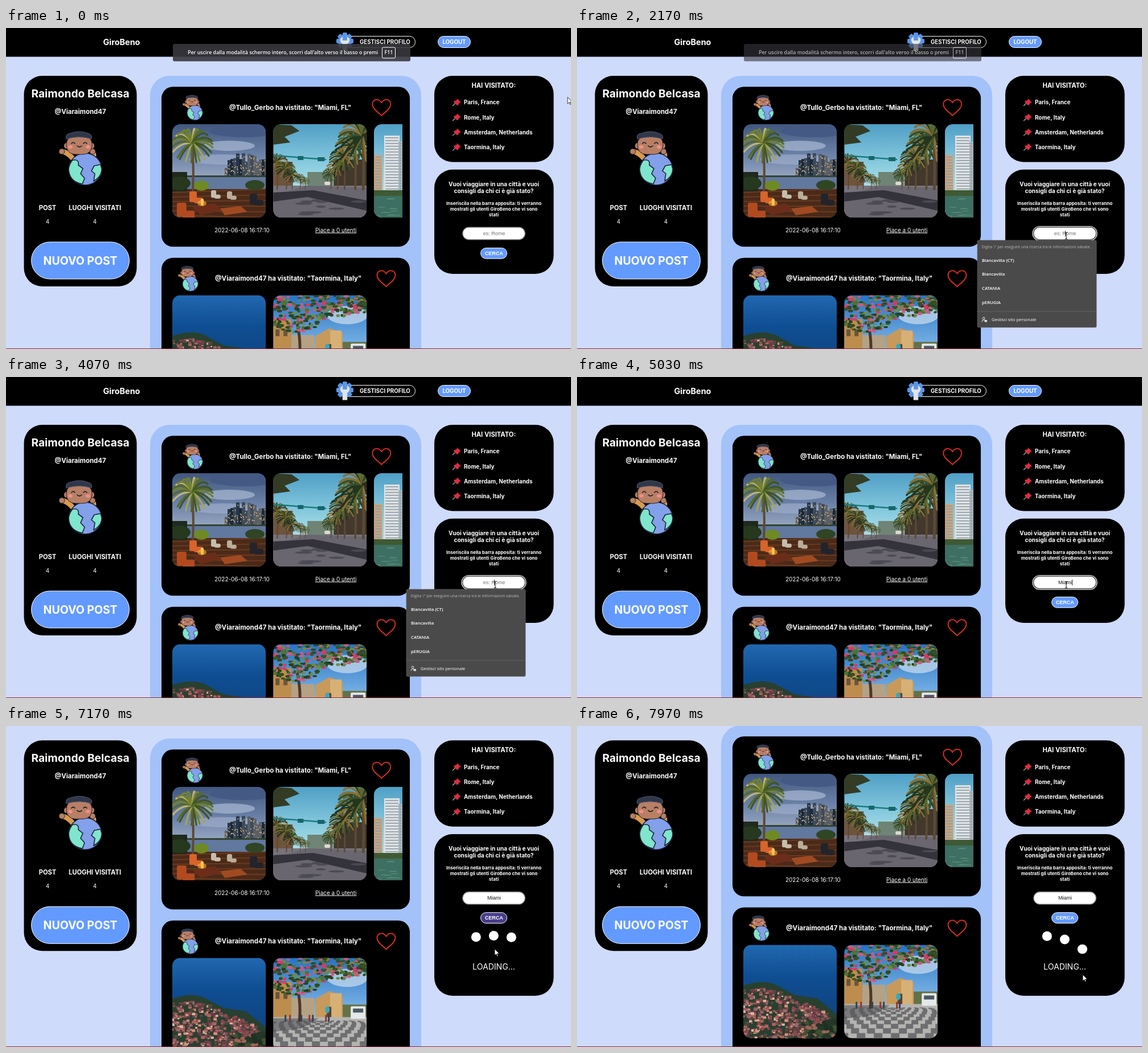
An HTML page for the animation above (8000 ms loop, 992 px wide and 564 px high).

```html
<!DOCTYPE html>
<html lang="it">
<head>
<meta charset="utf-8">
<style>
html, body { margin: 0; width: 100%; height: 100%; overflow: hidden; background: #cfdbfb; }
svg { display: block; }
text { font-family: Inter, sans-serif; font-weight: 700; fill: #fff; white-space: pre; }
.mid { text-anchor: middle; }
.regular { font-weight: 400; }
.ui { font-family: "Open Sans", sans-serif; font-weight: 600; }
.form { font-family: "Liberation Sans", Arial, sans-serif; }
</style>
</head>
<body>
<svg id="stage" width="992" height="564" viewBox="0 0 992 564"></svg>
<script>
const LOOP = 8000, OPEN = 1650, TYPE = 4200, KEY = 175, CLICK = 6545, STICKY = 58.7;
const BLUE = '#639aff', HOVER = '#483d8b';

let seed = 7;
const rnd = (a = 0, b = 1) => {
  seed = (seed * 16807) % 2147483647;
  return a + (b - a) * seed / 2147483647;
};
const pick = list => list[Math.floor(rnd(0, list.length))];
const many = (n, make) => Array.from({ length: n }, (_, i) => make(i)).join('');

const rect = (x, y, w, h, fill, r = 0, extra = '') =>
  `<rect x="${x}" y="${y}" width="${w}" height="${h}" rx="${r}" fill="${fill}" ${extra}/>`;
const oval = (x, y, rx, ry, fill, extra = '') =>
  `<ellipse cx="${x}" cy="${y}" rx="${rx}" ry="${ry}" fill="${fill}" ${extra}/>`;
const path = (d, fill, stroke = 'none', width = 1, extra = '') =>
  `<path d="${d}" fill="${fill}" stroke="${stroke}" stroke-width="${width}" stroke-linecap="round" stroke-linejoin="round" ${extra}/>`;
const text = (x, y, size, words, cls = '', extra = '') =>
  `<text x="${x}" y="${y}" font-size="${size}" class="${cls}" ${extra}>${words}</text>`;
const group = (x, y, body, extra = '', scale = 1) =>
  `<g transform="translate(${x} ${y}) scale(${scale})" ${extra}>${body}</g>`;
const pill = (x, y, w, h, fill, extra = '') => rect(x, y, w, h, fill, h / 2, `stroke="#fff" ${extra}`);
const gradient = (id, ...stops) => `<linearGradient id="${id}" x2="0" y2="1">${stops.map((c, i) =>
  `<stop offset="${i / (stops.length - 1)}" stop-color="${c}"/>`).join('')}</linearGradient>`;

function palm(x, y, r, colors, bottom) {
  const trunk = path(`M${x} ${y}Q${x + 3} ${(y + bottom) / 2} ${x + 1} ${bottom}`, 'none', '#5c4a35', r / 9);
  return trunk + many(24, i => {
    const a = i / 24 * 6.28 + rnd(0, .2), dx = Math.cos(a) * r, dy = Math.sin(a) * r * .8;
    return path(`M${x} ${y}Q${x + dx * .6} ${y + dy * .8 - r * .25} ${x + dx} ${y + dy + r * .15}`,
      'none', pick(colors), r / 11);
  });
}

const chair = (x, y, s, fill) => rect(x, y, 13 * s, 19 * s, fill, 3) + rect(x + 8 * s, y + 11 * s, 16 * s, 10 * s, fill, 3);

function duskTerrace() {
  const city = many(15, i => {
    const x = 92 + i * 5, h = rnd(16, 33) + (i > 2 && i < 12 ? 10 : 0);
    return rect(x, 93 - h, 6, h, pick(['#26364c', '#3c4a5c', '#1c2939', '#5b5f66'])) +
      many(5, () => rect(x + rnd(0, 4), 92 - rnd(2, h - 2), 1.5, 2, '#d9b678'));
  });
  return rect(0, 0, 164, 164, 'url(#dusk)') +
    oval(125, 12, 60, 11, '#445a85') + oval(100, 38, 45, 9, '#a9b9d3', 'opacity=".7"') +
    oval(90, 62, 60, 9, '#a3b3cf', 'opacity=".6"') +
    city + rect(0, 92, 164, 30, '#61789f') + rect(0, 90, 164, 3, '#33422f') + rect(0, 114, 164, 50, '#4a2a19') +
    many(6, i => path(`M0 ${120 + i * 8}L164 ${114 + i * 10}`, 'none', '#6b3a1f', 2)) +
    rect(0, 84, 26, 34, '#1f2a1c') +
    oval(12, 104, 20, 12, '#26381e') + oval(51, 108, 13, 9, '#6e8a22') + oval(145, 107, 17, 9, '#2f4524') +
    palm(35, 33, 36, ['#73812f', '#a8a355', '#3f5526', '#55692c', '#c0b56c'], 116) +
    chair(30, 118, 1, '#d6642c') + chair(8, 138, 1.3, '#b24a20') +
    chair(68, 116, .7, '#c6bdaa') + chair(96, 118, .7, '#b9ae9b') + chair(136, 122, 1, '#22242b') +
    path('M36 146l38 -7 14 12 -38 9z', '#6b2d19') + path('M84 148l36 -4 12 10 -40 6z', '#a04a22') +
    rect(50, 131, 5, 12, '#ffd667', 2) + oval(52, 139, 8, 5, '#ffb23a', 'opacity=".6"');
}

function palmStreet() {
  const greens = ['#23371f', '#38502a', '#5b6730', '#8a6f34', '#2b2c1d'];
  return rect(0, 0, 164, 164, 'url(#noon)') +
    rect(0, 66, 34, 48, '#6f543c') + rect(106, 62, 58, 52, '#43382c') + rect(60, 84, 45, 24, '#6f8474') +
    rect(0, 108, 164, 56, '#77737c') + path('M0 126L60 108 164 112V164H0z', '#69666f') +
    path('M0 120L70 116 164 134V152L60 128 0 136z', '#34333c') +
    many(9, () => oval(rnd(40, 150), rnd(134, 160), rnd(8, 20), 2, '#4c4a54')) +
    many(10, i => palm([6, 22, 32, 46, 55, 100, 112, 124, 143, 157][i], [66, 78, 90, 94, 99, 87, 74, 57, 38, 20][i],
      [20, 17, 13, 10, 9, 14, 18, 25, 34, 42][i], greens, 114)) +
    path('M0 0L32 2 46 12 20 22 30 32 0 36z', '#333b25') +
    path('M0 55L92 62', 'none', '#167d80', 2.5) + rect(43, 56, 10, 7, '#16666a') + rect(78, 58, 12, 7, '#16666a') +
    rect(90, 101, 10, 6, '#ded9d0', 2);
}

function towers() {
  const tower = (x, y, w, h, wall) => rect(x, y, w, h, wall) +
    many(Math.floor(h / 5), i => rect(x + 2, y + 3 + i * 5, w - 4, 1.6, '#8d9aa5'));
  return rect(0, 0, 50, 164, 'url(#noon)') + tower(0, 54, 15, 66, '#c6a582') +
    tower(18, 20, 27, 102, '#dfe3e4') + tower(43, 30, 7, 92, '#a8b4bd') + rect(0, 116, 50, 12, '#3e5a34') +
    rect(0, 126, 50, 38, '#3d6f62') + many(12, () => rect(rnd(0, 40), rnd(130, 162), 12, 1.2, '#5c8b78'));
}

function hillTown() {
  const walls = ['#b0655c', '#d4957f', '#8b4a50', '#dcb8a2', '#603c46', '#98696c', '#3f4a3c'];
  return rect(0, 0, 164, 164, 'url(#sea)') +
    path('M0 72Q30 60 55 69L90 88 130 94 164 122V164H0z', '#27402f') +
    many(480, () => {
      const x = rnd(-3, 150), top = 76 + Math.max(0, x - 50) * .45, y = top + rnd() * (164 - top), s = rnd(3, 7);
      return rect(x, y, s, s * .8, pick(walls)) + rect(x, y - 1, s, 1.4, '#87434a');
    }) + path('M100 164Q125 132 164 128V164z', '#24382a') +
    many(40, () => oval(rnd(105, 164), rnd(136, 164), 4, 3, pick(['#3d5131', '#9c6453', '#1f3023'])));
}

function blossomSquare() {
  const tiles = many(11, r => many(24, c => {
    const y = 110 + r * r * .45, h = 1.4 + r * .9, w = 5 + r;
    return (r + c) % 2 ? '' : rect(82 + (c - 12) * w, y, w, h, '#6d6e70');
  }));
  return rect(0, 0, 164, 164, 'url(#noon2)') + oval(130, 35, 36, 16, '#cfdfef', 'opacity=".7"') +
    rect(0, 42, 32, 66, '#bd8d4e') + rect(4, 60, 7, 12, '#6b543a') + rect(18, 60, 7, 12, '#6b543a') +
    rect(32, 70, 40, 38, '#b5a184') + path('M74 72L98 58 122 66V106H74z', '#c79a5b') + rect(100, 62, 20, 44, '#d7b076') +
    rect(94, 86, 8, 20, '#5b4029') + rect(122, 82, 42, 24, '#647148') +
    rect(0, 104, 164, 60, '#b5b4b0') + tiles + path('M0 106H80L50 124 0 130z', '#55555a', 'none', 1, 'opacity=".6"') +
    rect(136, 85, 26, 22, '#e4e8ea', 2) + rect(140, 89, 18, 7, '#4b5962') +
    path('M46 110Q49 80 42 50', 'none', '#4b3728', 5) +
    many(340, () => {
      const x = rnd(0, 164), low = x < 85 ? 66 - Math.abs(x - 40) * .2 : 42 - (x - 85) * .15;
      return oval(x, rnd(0, low), rnd(2, 5), rnd(1.5, 3),
        pick(['#36552a', '#4d7434', '#26401f', '#2f4a25', '#6d8c42', '#d6386f', '#c95c82']));
    }) +
    many(7, i => rect([20, 28, 48, 62, 68, 91, 96][i], 100, 3, 12, ['#383f59', '#8c3b35'][i % 2], 1)) +
    oval(95, 91, 4, 6, '#37a8bd');
}

const avatar = (() => {
  const ink = '#1c2233', skin = '#b97f64';
  return path('M24 47Q16 37 6 35', 'none', '#d89b4e', 9) + oval(5, 35, 5, 5, skin, `stroke="${ink}"`) +
    path('M57 48Q65 44 60 36', 'none', '#e0a458', 7) + oval(59, 35, 5, 5, skin, `stroke="${ink}"`) +
    oval(46, 66, 29, 28, '#83a0ea', `stroke="${ink}" stroke-width="1.5"`) +
    path('M24 50Q36 48 34 59L42 65 38 74 45 82 41 92Q18 88 17 66 18 57 24 50z', '#80e5cd', ink, 1.6) +
    path('M73 58L62 60 57 69 63 74 61 87Q76 78 75 65z', '#80e5cd', ink, 1.6) +
    oval(13, 25, 4, 5, skin) + oval(58, 25, 4, 5, skin) +
    rect(13, 7, 45, 33, skin, 15, `stroke="${ink}"`) +
    path('M13 13Q10 4 20 3 36 -3 51 3 60 6 57 13 36 6 13 13z', '#30374a', '#4d566b') +
    path('M22 21q3 -4 6 0M43 21q3 -4 6 0M32 25q4 4 8 0', 'none', ink, 1.7) +
    oval(20, 27, 4, 3, '#ef8f88') + oval(51, 27, 4, 3, '#ef8f88');
})();

const heart = path('M0 14.5C-5 9 -16 3 -16 -5.5C-16 -10.5 -12.5 -13.5 -8.5 -13.5C-5 -13.5 -2 -11.5 0 -8' +
  'C2 -11.5 5 -13.5 8.5 -13.5C12.5 -13.5 16 -10.5 16 -5.5C16 3 5 9 0 14.5Z', 'none', '#e42f25', 1.8);

const gear = many(8, i => rect(-4, -15, 8, 9, '#5b95e6', 2, `transform="rotate(${i * 45})"`)) + oval(0, 0, 12, 12, '#5b95e6') +
  path('M-4 17V5Q-9 2 -8 -4L-4 -8V-1H4V-8L8 -4Q9 2 4 5V17z', '#e2e6ea', '#b9c4d0', .7);

const pin = path('M0 12L5 7', 'none', '#a9b4bd', 1.3) + path('M8 0L14 6 11 7 9 11 7 11 2 6 2 4 6 3z', '#dd2e44', '#b01f34', .6);

function post(y, title, titleX, avatarX, heartX, photos) {
  const frames = photos.map((photo, i) => i < 2
    ? group(292 + i * 177.2, 65.7, photo, 'clip-path="url(#round)"')
    : `<svg x="646" y="65.7" width="50" height="164">${group(0, 0, photo, 'clip-path="url(#round)"')}</svg>`).join('');
  return group(0, y, rect(273, 0, 436, 281, '#000', 20) +
    group(avatarX, 14.5, avatar, '', .47) + text(titleX, 40.3, 11.45, title) +
    group(heartX, 36, heart) + frames + text(366, 255.3, 9.95, '2022-06-08 16:17:10', 'regular') +
    text(543, 255.3, 9.95, 'Piace a 0 utenti', 'regular', 'text-decoration="underline"'));
}

const defs = `<defs><clipPath id="round"><rect width="164" height="164" rx="14"/></clipPath>` +
  gradient('dusk', '#41577f', '#6c82a8', '#a7b4c8', '#7386a2') + gradient('noon', '#4f9fc6', '#93d2e2', '#d5edea') +
  gradient('noon2', '#2773c4', '#72ade2', '#c7ddea') + gradient('sea', '#2168b0', '#0f4e92', '#0f4684', '#123e70') + '</defs>';

const page = rect(0, 0, 992, 50.5, '#000') + text(170.5, 30, 14.4, 'GiroBeno') +
  pill(592, 14.5, 126.5, 20, '#000') + text(621, 28.2, 9.75, 'GESTISCI PROFILO') + group(595, 23, gear) +
  pill(758.5, 14.5, 57, 20, BLUE) + text(787, 28.2, 9.75, 'LOGOUT', 'mid') +
  rect(253, 84, 476, 900, '#a3c2fa', 34) +
  post(103.3, '@Tullo_Gerbo ha vistitato: "Miami, FL"', 392, 310, 659.3, [duskTerrace(), palmStreet(), towers()]) +
  post(403.8, '@Viaraimond47 ha vistitato: "Taormina, Italy"', 367, 302, 667.5, [hillTown(), blossomSquare()]);

const side = rect(31.5, 84, 198, 370, '#000', 32) + text(130.6, 122, 19.2, 'Raimondo Belcasa', 'mid') +
  text(130.6, 150.5, 11.4, '@Viaraimond47', 'mid') + group(93, 182, avatar) +
  text(73, 320, 11.2, 'POST', 'mid') + text(156, 320, 11.2, 'LUOGHI VISITATI', 'mid') +
  text(73, 343.5, 9.95, '4', 'mid regular') + text(156, 343.5, 9.95, '4', 'mid regular') +
  pill(44.5, 376, 172, 65, BLUE) + text(130.6, 415.5, 19.5, 'NUOVO POST', 'mid') +
  rect(752, 84, 209.5, 151.5, '#000', 32) + text(856.3, 105, 11.2, 'HAI VISITATO:', 'mid') +
  ['Paris, France', 'Rome, Italy', 'Amsterdam, Netherlands', 'Taormina, Italy'].map((place, i) =>
    group(784.5, 124.5 + i * 26.2, pin) + text(804, 134.3 + i * 26.2, 9.85, place)).join('') +
  rect(752, 248.7, 209.5, 183.3, '#000', 32, 'id="searchPanel"') +
  text(856.5, 278, 10.05, 'Vuoi viaggiare in una città e vuoi', 'mid') + text(856.5, 290, 10.05, 'consigli da chi ci è già stato?', 'mid') +
  text(856.5, 310.8, 8.05, 'Inseriscila nella barra apposita: ti verranno', 'mid') +
  text(856.5, 320.8, 8.05, 'mostrati gli utenti GiroBeno che vi sono', 'mid') + text(856.5, 330.5, 8.05, 'stati', 'mid') +
  rect(800, 348.5, 113, 25, 'none', 12.5, 'id="ring" stroke="#fff" stroke-width="1.2"') +
  rect(801.8, 350.2, 109.5, 21.6, '#fff', 10.8, 'stroke="#858585" stroke-width="1.3"') +
  text(857, 364, 9, '', 'mid form regular', 'id="query"') + rect(0, 356, .8, 10, '#000', 0, 'id="caret"') +
  pill(833.5, 386.5, 46, 18.7, BLUE, 'id="search"') + text(856.8, 399, 9, 'CERCA', 'mid form') +
  `<g id="loader">${many(3, () => oval(0, 0, 8.5, 8.5, '#fff', 'class="dot"'))}${text(856.5, 486.5, 14.1, 'LOADING...', 'mid regular')}</g>`;

const notice = rect(293, 28, 417, 30.5, '#38383d', 3, 'opacity=".9"') +
  text(319, 46.2, 8.9, "Per uscire dalla modalità schermo intero, scorri dall'alto verso il basso o premi", 'ui') +
  rect(660.5, 34, 23, 19, 'none', 2, 'stroke="#fff"') + text(672, 46.4, 8.9, 'F11', 'mid ui');

const suggestions = rect(703, 373, 209, 153, '#4a4a4a', 2, 'stroke="#5c5c5c" stroke-width=".7"') +
  text(710.5, 387, 6.9, "Digita '/' per eseguire una ricerca tra le informazioni salvate.", 'ui', 'style="fill:#b9b9b9;font-weight:400"') +
  ['Biancavilla (CT)', 'Biancavilla', 'CATANIA', 'pERUGIA'].map((word, i) => text(711, 410.5 + i * 24.9, 7.75, word, 'ui')).join('') +
  path('M703 498H912', 'none', '#6a6a6a', .7) + oval(714, 510, 2, 2, 'none', 'stroke="#ddd"') +
  path('M711 516Q711 513 714 513H716', 'none', '#ddd') + rect(715.5, 513, 4.5, 3.5, '#ddd', .5) +
  text(728, 515, 7.5, 'Gestisci sito personale', 'ui', 'style="font-weight:400"');

const arrow = path('M0 0V11L2.6 8.6 4.4 12.4 6 11.6 4.3 8H7.8Z', '#fff', '#111', .8);
const beam = path('M-2 -6Q0 -6 0 -4.5Q0 -6 2 -6M0 -5V5M-2 6Q0 6 0 4.5Q0 6 2 6', 'none', '#111', 1);

const $ = id => document.getElementById(id);
$('stage').innerHTML = defs + `<g id="page">${page}</g><g id="side">${side}</g><g id="notice">${notice}</g>` +
  `<g id="suggestions">${suggestions}</g><g id="cursor"><g id="arrow">${arrow}</g><g id="beam">${beam}</g></g>` +
  rect(0, 563, 992, 1, '#96203a');

const clamp = v => Math.min(1, Math.max(0, v));
const smooth = p => p * p * (3 - 2 * p);
const show = (id, on) => $(id).style.display = on ? '' : 'none';
const shift = (id, x, y) => $(id).setAttribute('transform', `translate(${x} ${y})`);

// CSS "ease", i.e. cubic-bezier(.25, .1, .25, 1)
function ease(p) {
  let lo = 0, hi = 1, u = .5;
  for (let i = 0; i < 16; i++) {
    u = (lo + hi) / 2;
    if (.75 * u * (1 - u) + u ** 3 < p) lo = u; else hi = u;
  }
  return .3 * u * (1 - u) ** 2 + 3 * u * u * (1 - u) + u ** 3;
}

const route = [[30, 986, 122], [330, 958, 207], [800, 958, 207], [1500, 859, 365],
  [5850, 859, 365], [6350, 858, 392], [7430, 858, 392], [7900, 888, 437]];
function pointer(t) {
  const next = route.findIndex(k => k[0] > t), end = next < 0 ? route.length - 1 : Math.max(1, next);
  const [a, b] = [route[end - 1], route[end]];
  const p = smooth(clamp((t - a[0]) / (b[0] - a[0])));
  return [a[1] + (b[1] - a[1]) * p, a[2] + (b[2] - a[2]) * p];
}

function bounce(dot, i, t) {
  const phase = (t - CLICK) / 500 - i * .27, turn = ((phase % 2) + 2) % 2;
  const p = phase < 0 ? 1 : turn > 1 ? 2 - turn : turn;
  const shape = ease(clamp(p / .4)), height = 4.25 + 12.75 * shape;
  dot.setAttribute('cx', 825.3 + i * 31);
  dot.setAttribute('cy', 418.8 + 51 * (1 - ease(p)) + height / 2);
  dot.setAttribute('rx', 8.5 * (1.7 - .7 * shape));
  dot.setAttribute('ry', height / 2);
}

function render(t) {
  const scroll = 85 * (1 - (1 - clamp((t - 6955) / 450)) ** 2);
  shift('page', 0, -scroll);
  shift('side', 0, -Math.min(scroll, STICKY));

  const fade = 1 - clamp((t - 2000) / 550);
  $('notice').setAttribute('opacity', fade);

  const [x, y] = pointer(t), focused = t >= OPEN && t < CLICK;
  const overInput = t < CLICK && Math.abs(x - 857) < 55 && Math.abs(y - 361) < 11;
  shift('cursor', x, y);
  show('arrow', !overInput);
  show('beam', overInput);
  show('suggestions', t >= OPEN && t < TYPE);

  const typed = 'Miami'.slice(0, Math.max(0, Math.floor((t - TYPE) / KEY) + 1));
  $('query').textContent = typed || 'es: Rome';
  $('query').style.fill = typed ? '#111' : '#757575';
  show('ring', focused);
  const idle = Math.max(0, t - (typed ? TYPE + 4 * KEY : OPEN));
  show('caret', focused && Math.floor(idle / 530) % 2 === 0);
  $('caret').setAttribute('x', 857 + (typed ? $('query').getComputedTextLength() / 2 : 0));

  $('search').setAttribute('fill', t > 6200 && t < 7400 ? HOVER : BLUE);
  const loading = t >= CLICK;
  show('loader', loading);
  $('searchPanel').setAttribute('height', loading ? 284 : 183.3);
  document.querySelectorAll('.dot').forEach((dot, i) => bounce(dot, i, t));
}

(function tick() {
  render(performance.now() % LOOP);
  requestAnimationFrame(tick);
})();
</script>
</body>
</html>
```
